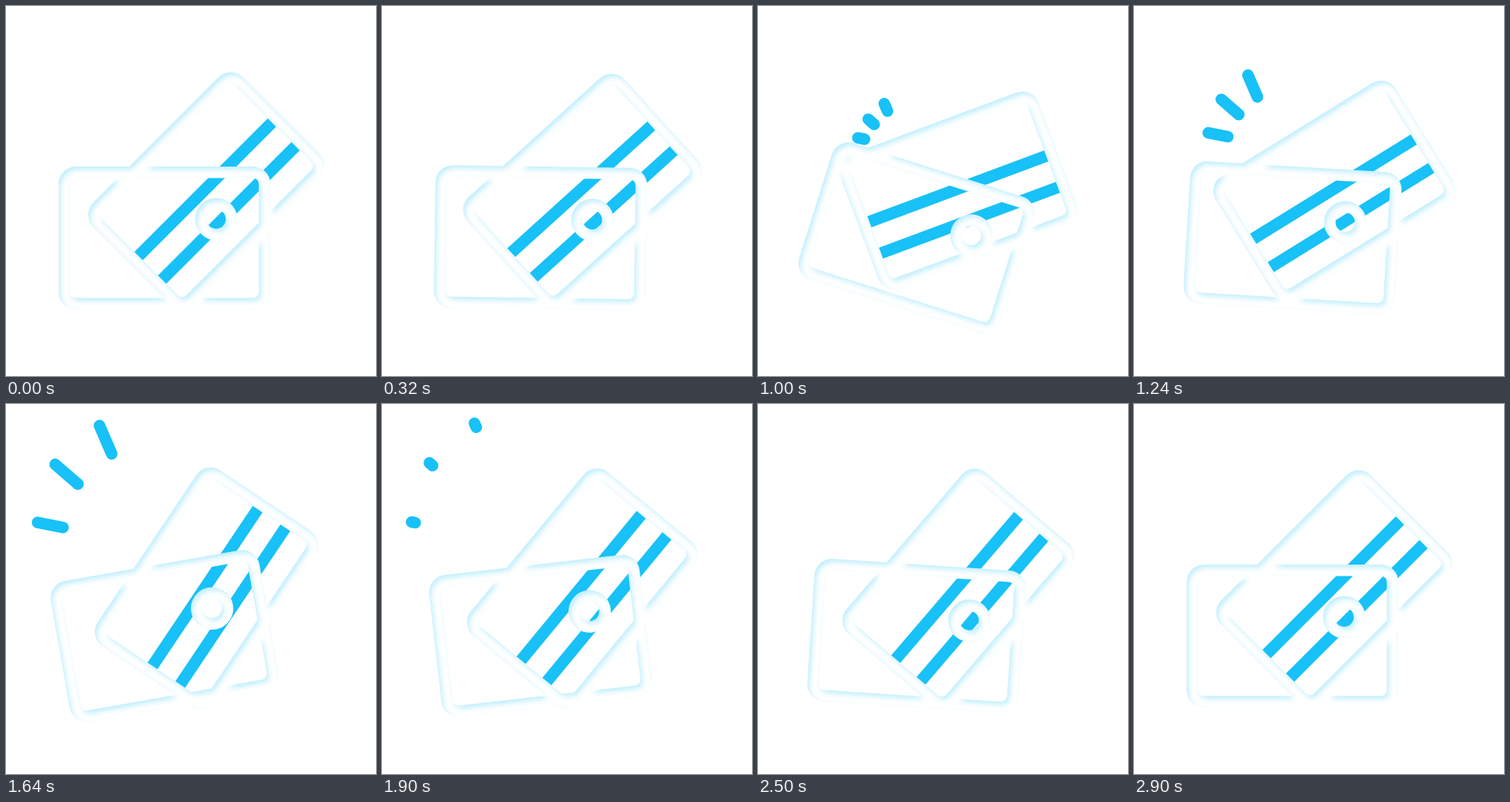
Write an HTML page that moves like this. It is 500 px wide and 500 px high and loops after 4 s.

```html
<!DOCTYPE html>
<html lang="en">
<head>
<meta charset="utf-8">
<title>Cards</title>
<style>
  html, body { margin: 0; width: 100%; height: 100%; overflow: hidden; background: #fff; }
  svg { display: block; width: 100%; height: 100%; }
</style>
</head>
<body>
<svg viewBox="0 0 500 500">
  <defs>
    <filter id="inset" filterUnits="userSpaceOnUse" x="0" y="0" width="500" height="500" color-interpolation-filters="sRGB">
      <feOffset in="SourceAlpha" dx="3" dy="4"/>
      <feGaussianBlur stdDeviation="3.6" result="soft"/>
      <feFlood flood-color="#18c1f7" flood-opacity=".28"/>
      <feComposite operator="out" in2="soft"/>
      <feComposite operator="in" in2="SourceAlpha" result="shade"/>
      <feMerge>
        <feMergeNode in="SourceGraphic"/>
        <feMergeNode in="shade"/>
      </feMerge>
    </filter>
    <rect id="frame" x="-135.3" y="-88.8" width="270.6" height="177.6" rx="15.8"/>
  </defs>
  <g id="rays" stroke="#18c1f7" stroke-width="15.6" stroke-linecap="round"></g>
  <g class="card" fill="#18c1f7">
    <rect x="-133" y="-10.2" width="266" height="16"/>
    <rect x="-133" y="35" width="266" height="15.8"/>
  </g>
  <g filter="url(#inset)" fill="none" stroke="#fff" stroke-width="15.6">
    <g class="card"><use href="#frame"/></g>
    <g class="wallet">
      <use href="#frame"/>
      <circle cx="69.8" cy="-25.5" r="20.8"/>
    </g>
  </g>
</svg>
<script>
const LOOP = 4000;

// [time, angle, skew]: skew > 1 delays the swing towards that key
const CARD = [[0, -45], [950, -20, 1.4], [1715, -57], [2160, -39.5], [2520, -49.5], [2900, -45]];
const WALLET = [[0, 0], [715, 25.5, 2.7], [1625, -10], [2450, 4], [2800, 0]];

// start x, y, end x, y
const RAYS = [[144, 180, 40, 159.5], [157, 160, 64, 79.5], [175, 142, 125, 26]];

const clamp = x => Math.min(1, Math.max(0, x));
const mix = (a, b, p) => a + (b - a) * p;
const span = (t, from, to) => clamp((t - from) / (to - from));
const swing = x => (1 - Math.cos(Math.PI * x)) / 2;

function angleAt(keys, t) {
  const i = keys.findIndex(k => k[0] > t);
  if (i < 0) return keys[keys.length - 1][1];
  const [t0, a] = keys[i - 1];
  const [t1, b, skew = 1] = keys[i];
  return mix(a, b, swing(span(t, t0, t1) ** skew));
}

const rays = document.getElementById('rays');
const lines = RAYS.map(() =>
  rays.appendChild(document.createElementNS('http://www.w3.org/2000/svg', 'line')));
const cards = document.querySelectorAll('.card');
const wallet = document.querySelector('.wallet');

function draw(t) {
  const turn = `translate(270.8 249.3) rotate(${angleAt(CARD, t)})`;
  cards.forEach(c => c.setAttribute('transform', turn));
  wallet.setAttribute('transform', `translate(214.2 313.5) rotate(${angleAt(WALLET, t)})`);

  const head = span(t, 938, 1660);
  const tail = span(t, 1103, 1940);
  rays.setAttribute('visibility', head > tail ? 'visible' : 'hidden');
  RAYS.forEach(([x0, y0, x1, y1], i) => {
    const set = (name, value) => lines[i].setAttribute(name, value);
    set('x1', mix(x0, x1, tail));
    set('y1', mix(y0, y1, tail));
    set('x2', mix(x0, x1, head));
    set('y2', mix(y0, y1, head));
  });
}

const began = performance.now();
function tick() {
  draw((performance.now() - began) % LOOP);
  requestAnimationFrame(tick);
}
tick();
</script>
</body>
</html>
```
